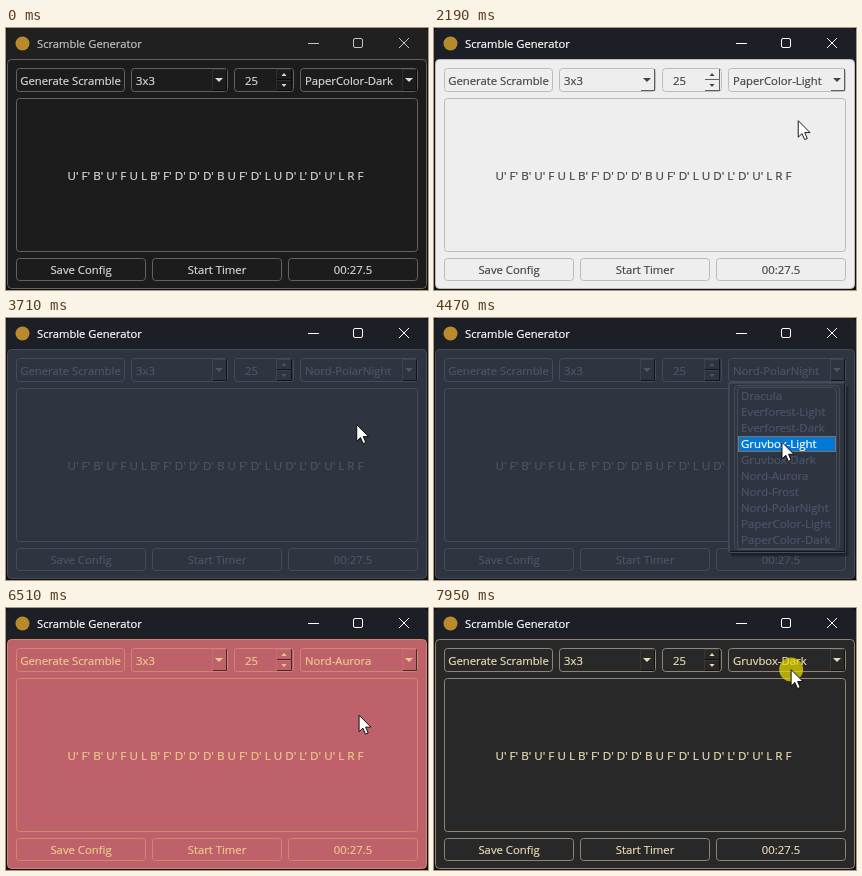
Recreate the animation shown at these times as an HTML page. Size 422x262 px, loop 8 s.

```html
<!DOCTYPE html>
<html lang="en">
<head>
<meta charset="utf-8">
<title>Scramble Generator</title>
<style>
html, body { margin: 0; width: 100%; height: 100%; overflow: hidden; background: #111; }
svg { display: block; width: 422px; height: 262px; }
text { font: 11.3px "Open Sans", "Noto Sans", sans-serif; white-space: pre;
  fill: var(--fg); stroke: var(--fg); stroke-width: .2px; }
.mid { text-anchor: middle; }
.frame { fill: var(--bg); stroke: var(--line); }
.arrow { fill: var(--fg); }
.hi, .lo { fill: none; stroke: #fff; stroke-opacity: .08; }
.lo { stroke: #000; stroke-opacity: .6; }
#bar { fill: #202020; color: #c4c4c4; }
#bar text { font-size: 11.2px; fill: currentColor; stroke: currentColor; }
#bar .glyph { fill: none; stroke: currentColor; }
#bar.active { fill: #1c1f26; color: #fff; }
#popup text { font-size: 11.5px; }
#popup text.on { fill: #fff; stroke: #fff; }
#mark { fill: #0078d7; stroke: #ff8728; stroke-dasharray: 1 1; }
</style>
</head>
<body>
<svg id="stage" viewBox="0 0 422 262">
  <rect width="422" height="262" fill="#111"/>
  <g id="bar">
    <rect width="422" height="36" rx="5"/>
    <circle cx="16.5" cy="15.5" r="7" fill="#b98a2c"/>
    <text x="31" y="20">Scramble Generator</text>
    <path class="glyph" d="M302 15.5h11M393 10l10 10m0-10l-10 10"/>
    <rect class="glyph" x="347.5" y="10.5" width="9" height="9" rx="1.5"/>
  </g>
  <rect class="frame" x="1.5" y="31.5" width="419" height="229" rx="4"/>
  <g id="form"></g>
  <g id="popup"></g>
  <circle id="click" r="12" fill="#e6dc00" fill-opacity=".73"/>
  <path id="cursor" d="M0 0v16.5l3.8-3.6 2.6 6 2.7-1.1-2.6-5.9h5.3z" fill="#fff" stroke="#000" stroke-width=".9"/>
</svg>
<script>
const LOOP = 8000, STEP = 70, COMBO_Y = 48, LIST_Y = 70, ROW = 16;
const $ = id => document.getElementById(id);

const themes = ["Dracula", "Everforest-Light", "Everforest-Dark", "Gruvbox-Light", "Gruvbox-Dark",
  "Nord-Aurora", "Nord-Frost", "Nord-PolarNight", "PaperColor-Light", "PaperColor-Dark"];
// background, text, border
const colors = {
  "PaperColor-Dark": ["#1c1c1c", "#d8d8d8", "#626262"],
  "PaperColor-Light": ["#eeeeee", "#444444", "#bcbcbc"],
  "Nord-PolarNight": ["#2e3440", "#4c566a", "#434c5e"],
  "Nord-Frost": ["#5e81ac", "#8fbcbb", "#81a1c1"],
  "Nord-Aurora": ["#bf616a", "#ebcb8b", "#d08770"],
  "Gruvbox-Dark": ["#282828", "#ebdbb2", "#928374"]
};

// Each round presses the combo box, opens the list, stops at (x, y) and
// picks the next theme up the list.
const rounds = [
  { press: 770, open: 840, stop: 1380, x: 388, y: 208, bow: 73 },
  { press: 2330, open: 2400, stop: 2960, x: 355, y: 198 },
  { press: 3920, open: 3990, stop: 4610, x: 348, y: 172 },
  { press: 5150, open: 5350, stop: 5900, x: 354, y: 156 },
  { press: 6790, open: 6860, stop: 7270, x: 352, y: 141 },
  { press: 7950, open: LOOP, stop: LOOP, x: 358, y: COMBO_Y }
];
const entry = { apply: 70, x: 419, y: 238 };
for (const r of rounds) {
  r.pick = r.stop + 200;
  r.apply = r.pick + STEP;
}

const box = (x, y, w, h, r = 3) =>
  `<rect class="frame" x="${x + .5}" y="${y + .5}" width="${w - 1}" height="${h - 1}" rx="${r}"/>`;
const label = (x, y, s, more = "") => `<text x="${x}" y="${y}" ${more}>${s}</text>`;
const button = (x, y, w, h, s) => box(x, y, w, h) + label(x + w / 2, y + h - 7, s, 'class="mid"');
const bevel = (x, y, w, h) =>
  `<path class="hi" d="M${x + .5} ${y + h - 1}V${y + .5}h${w - 2}"/>` +
  `<path class="lo" d="M${x + 1} ${y + h - .5}h${w - 1.5}V${y}"/>`;
const arrow = (x, y, w, h) => `<path class="arrow" d="M${x - w} ${y}h${2 * w}l${-w} ${h}z"/>`;
const combo = (x, w, s, more) => box(x, 40, w, 24) + label(x + 5, 57, s, more) +
  bevel(x + w - 16, 41, 15, 22) + arrow(x + w - 9, 50, 4, 4);

$("form").innerHTML =
  button(10, 40, 109, 24, "Generate Scramble") +
  combo(125, 97, "3x3") +
  box(228, 40, 60, 24) + label(239, 57, "25") +
  bevel(270, 41, 16, 11) + bevel(270, 52, 16, 11) + arrow(278, 48, 2.5, -3) + arrow(278, 56, 2.5, 3) +
  combo(294, 118, "", 'id="current"') +
  box(10, 70, 402, 154) +
  label(209.5, 152, "U' F' B' U' F U L B' F' D' D' D' B U F' D' L U D' L' D' U' L R F",
    'class="mid" style="font-size:11.65px"') +
  ["Save Config", "Start Timer", "00:27.5"].map((s, i) => button(10 + 136 * i, 230, 130, 23, s)).join("");

$("popup").innerHTML =
  [0, 1, 2].map(i =>
    `<rect x="297" y="68" width="${118 - i}" height="${171 - i}" rx="2" fill-opacity=".15"/>`).join("") +
  box(294, 64, 118, 171, 2) + bevel(295, 65, 116, 169) +
  box(300, 67, 106, 165, 4) + box(303, 69, 100, 162, 3) +
  `<rect id="mark" x="304.5" width="97" height="15"/>` +
  themes.map((s, i) => label(307, LIST_Y + 12 + ROW * i, s)).join("");
const items = [...$("popup").querySelectorAll("text")];

// Straight move in steps, with an optional vertical bow.
function move(t, t0, t1, from, to, bow = 0) {
  const p = Math.min(1, Math.floor((t - t0) / STEP) * STEP / (t1 - t0));
  return [from.x + (to.x - from.x) * p,
    from.y + (to.y - from.y) * p + bow * Math.sin(Math.PI * p)];
}

function pointer(t, r, last) {
  const home = { x: r.x, y: COMBO_Y };
  if (t < r.open) return move(t, last.apply, r.press, last, home);
  return move(t, r.open, r.stop, home, r, r.bow ?? -9);
}

function show(node, on) { node.style.display = on ? "" : "none"; }

function draw(t) {
  const n = rounds.findIndex(r => t < r.apply);
  const r = rounds[n], theme = themes.length - 1 - n, name = themes[theme];
  ["--bg", "--fg", "--line"].forEach((v, i) => $("stage").style.setProperty(v, colors[name][i]));
  $("current").textContent = name;
  $("bar").classList.toggle("active", t >= rounds[0].press);

  const [x, y] = pointer(t, r, rounds[n - 1] ?? entry);
  const open = t >= r.open;
  show($("cursor"), t >= entry.apply);
  show($("click"), t >= r.pick || (t >= r.press && !open));
  for (const id of ["cursor", "click"]) $(id).setAttribute("transform", `translate(${x} ${y})`);

  show($("popup"), open);
  const row = Math.floor((y - LIST_Y) / ROW);
  const on = row < 0 ? theme : Math.min(row, themes.length - 1);
  $("mark").setAttribute("y", LIST_Y + .5 + ROW * on);
  items.forEach((node, i) => node.classList.toggle("on", i === on));
}

const start = performance.now();
function tick() {
  draw((performance.now() - start) % LOOP);
  requestAnimationFrame(tick);
}
tick();
</script>
</body>
</html>
```
